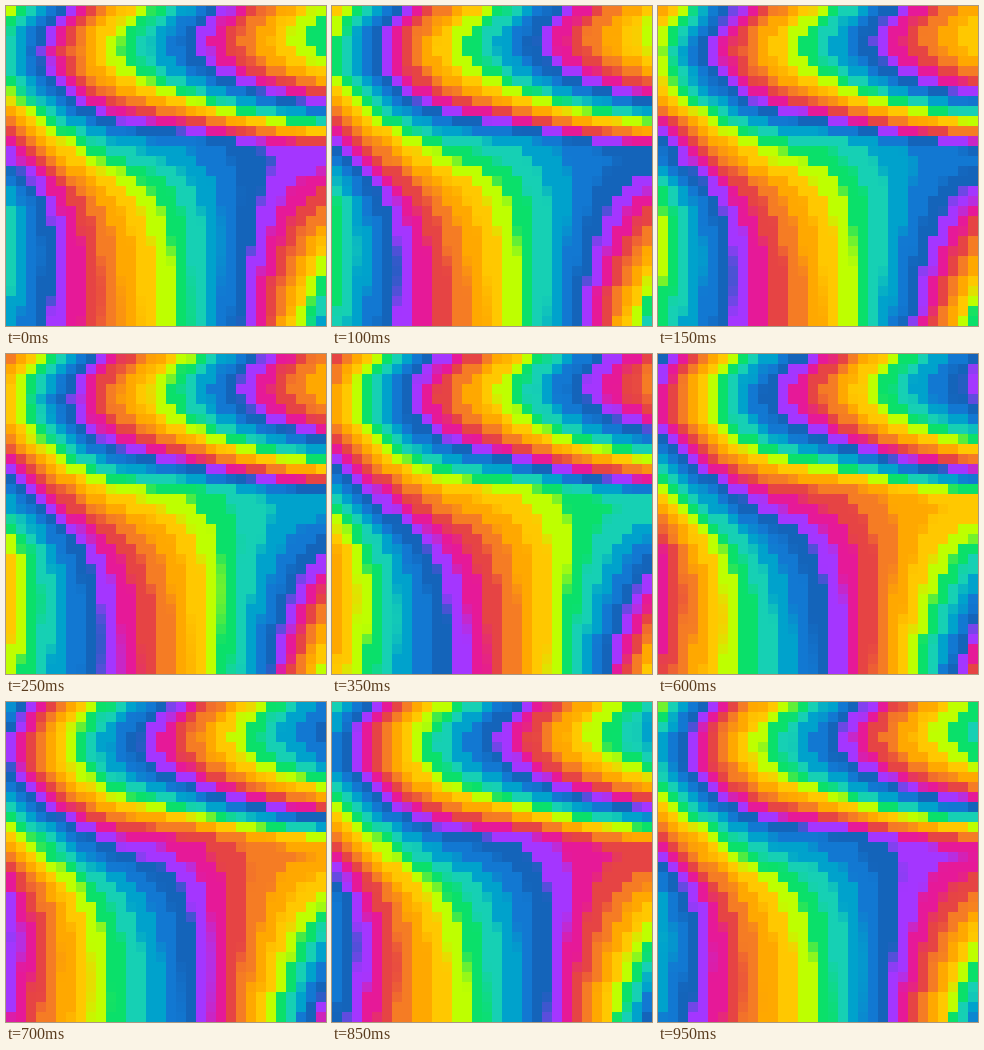
Recreate the animation shown at these times as an HTML page with a canvas. Size 320 by 320 pixels, loop 1000 ms.

```html
<!DOCTYPE html>
<html lang="en">
<head>
<meta charset="utf-8">
<title>Rainbow plasma</title>
<style>
  html, body { margin: 0; width: 100%; height: 100%; overflow: hidden; }
  canvas { display: block; width: 100vw; height: 100vh; image-rendering: pixelated; }
</style>
</head>
<body>
<canvas id="stage" width="320" height="320"></canvas>
<script>
const ctx = document.getElementById('stage').getContext('2d');
const N = 32, CELL = 10, LOOP = 1000, STEP = 50, BLEND = 0.2;

const palette = [
  [164, 54, 255], [230, 25, 152], [230, 68, 68], [245, 124, 36],
  [255, 168, 0], [255, 200, 0], [190, 255, 0], [10, 224, 106],
  [22, 208, 180], [0, 162, 204], [18, 120, 210], [20, 100, 186]
];
const BANDS = palette.length;

// Heights are measured in palette bands.
// Upper part: a rising crest that falls away on both sides.
function ridge(x, y) {
  const crest = -5.9 + 1.17 * x - 0.0112 * x * x;
  const away = Math.abs(y - 4.3 + 0.06 * x) / 10;
  return crest - 15.5 * away ** 1.9;
}

// Lower part: a slope to the right that bends upwards further down.
function slope(x, y) {
  const p = x / 16 - 1;
  const q = Math.max(0, (y - 15) / 16);
  const fade = Math.exp(-3.5 * q);
  return -5.4 + 2 * fade
    + (10 - 2.6 * fade) * p
    + (7.1 * q - 3.7) * p ** 2
    + 3 * q * p ** 3;
}

function smoothMax(a, b, width) {
  return (a + b + Math.hypot(a - b, width)) / 2;
}

// The two parts melt together on the left and meet in a crease on the right.
function height(x, y) {
  const width = 2 + 9 * Math.exp(-((x / 15) ** 4));
  return smoothMax(ridge(x, y), slope(x, y), width);
}

// Flat bands with a short blend across each border.
function colour(u) {
  const v = u + BLEND / 2, k = Math.floor(v);
  const at = n => palette[((n % BANDS) + BANDS) % BANDS];
  const mix = Math.min(1, (v - k) / BLEND);
  const from = at(k - 1), to = at(k);
  return `rgb(${to.map((c, i) => Math.round(from[i] + (c - from[i]) * mix))})`;
}

function draw(ms) {
  const shift = Math.floor((ms % LOOP) / STEP) * STEP / LOOP * BANDS;
  for (let y = 0; y < N; y++) {
    for (let x = 0; x < N; x++) {
      ctx.fillStyle = colour(height(x, y) - shift);
      ctx.fillRect(x * CELL, y * CELL, CELL, CELL);
    }
  }
}

const start = performance.now();
function tick() {
  draw(performance.now() - start);
  requestAnimationFrame(tick);
}
tick();
</script>
</body>
</html>
```
